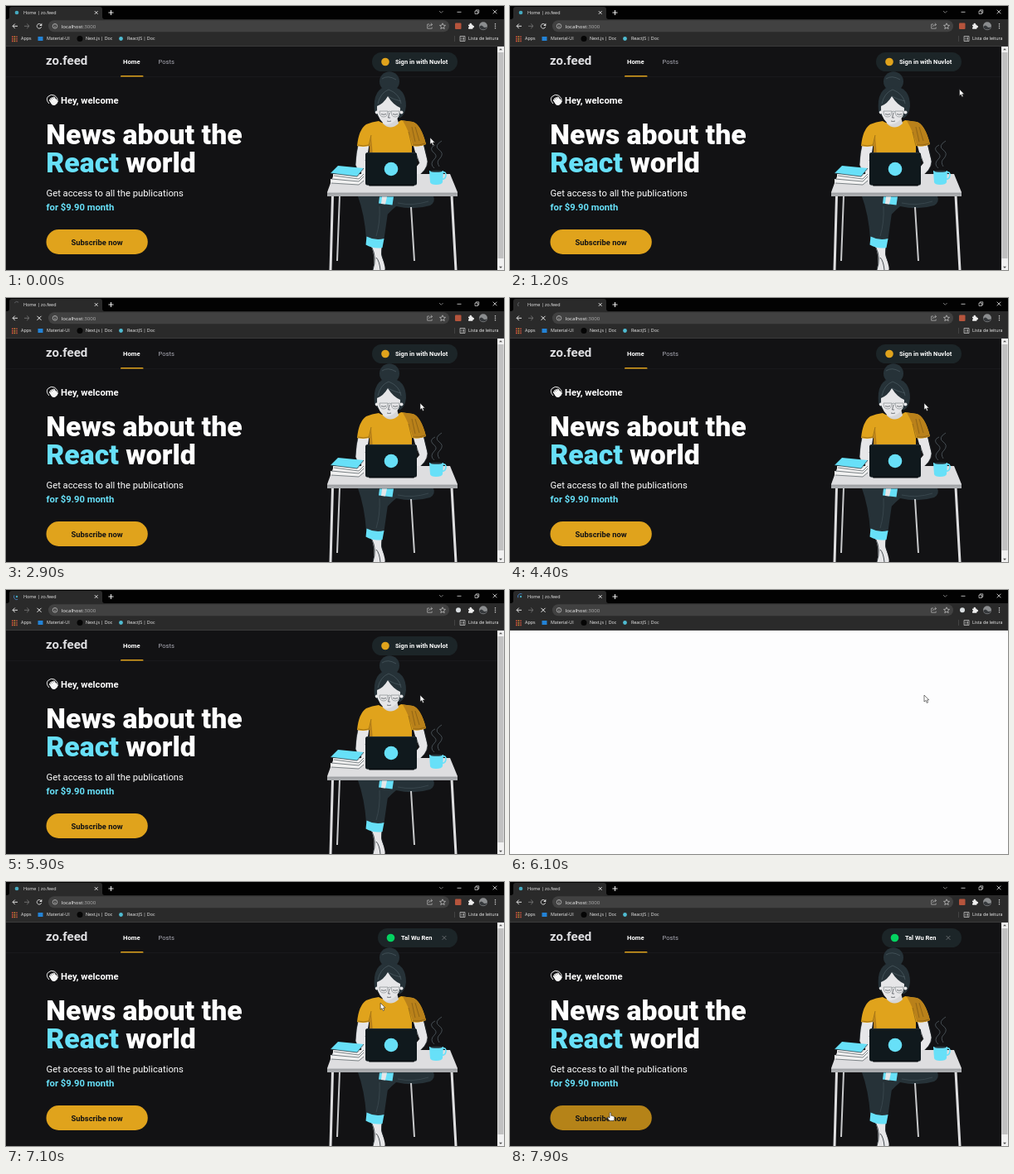
Animation, 600 px wide and 319 px high, one loop 8000 ms. Source, as an HTML page with a canvas:

```html
<!DOCTYPE html>
<html lang="en">
<head>
<meta charset="utf-8">
<title>Home | zo.feed</title>
<style>
html, body { margin: 0; width: 100%; height: 100%; overflow: hidden; background: #121214; }
canvas { display: block; width: 600px; height: 319px; }
</style>
</head>
<body>
<canvas id="stage" width="600" height="319"></canvas>
<script>
const ctx = document.getElementById("stage").getContext("2d");
const LOOP = 8000, STEP = 100;
const CLICK = 2400, RESPONSE = 5200, DEVTOOLS = 5900, BLANK = 6000, PAINTED = 6200,
      SIGNED_IN = 6500, LOADED = 6600, HOVER = 7800;
const CYAN = "#67e0f8", YELLOW = "#e0a31c", HAIR = "#263238", SKIN = "#e6e6e8", INK = "#20282c";
const UI = '"Open Sans", "Noto Sans", sans-serif', PAGE = "Roboto, sans-serif";

// time, x, y of the pointer tip
const route = [
  [0, 511, 159], [1200, 541.5, 100.5], [1500, 541.5, 100.5], [2100, 497, 68],
  [CLICK, 497, 68], [2800, 499, 127], [6900, 499, 127], [HOVER, 120, 278.5], [LOOP, 120, 278.5]
];

function pointerAt(t) {
  const i = route.findIndex(p => p[0] > t);
  const [t0, x0, y0] = route[i - 1], [t1, x1, y1] = route[i];
  const u = (t - t0) / (t1 - t0), k = u * u * (3 - 2 * u);
  return [x0 + (x1 - x0) * k, y0 + (y1 - y0) * k];
}

function rect(x, y, w, h, color, r = 0) {
  ctx.fillStyle = color;
  ctx.beginPath();
  ctx.roundRect(x, y, w, h, r);
  ctx.fill();
}

function dot(x, y, r, color) {
  ctx.fillStyle = color;
  ctx.beginPath();
  ctx.arc(x, y, r, 0, Math.PI * 2);
  ctx.fill();
}

function shape(d, color) {
  ctx.fillStyle = color;
  ctx.fill(new Path2D(d));
}

function line(d, color, width = 1) {
  ctx.strokeStyle = color;
  ctx.lineWidth = width;
  ctx.stroke(new Path2D(d));
}

function text(str, x, y, size, color, weight = 400, family = PAGE, align = "left") {
  ctx.font = `${weight} ${size}px ${family}`;
  ctx.fillStyle = color;
  ctx.textAlign = align;
  ctx.fillText(str, x, y);
}

function label(str, x, y, color = "#f2f2f2", size = 5.35) {
  text(str, x, y, size, color, 500, UI);
}

function cross(x, y, r, color, width = 0.9) {
  line(`M${x - r} ${y - r}L${x + r} ${y + r}M${x + r} ${y - r}L${x - r} ${y + r}`, color, width);
}

function tabIcon(t) {
  if (t < CLICK || t >= LOADED) return dot(13, 8, 2.3, "#45a9bf");
  const waiting = t < RESPONSE;
  const angle = (t - CLICK) / 1000 * Math.PI * 2 * (waiting ? -0.8 : 1.2);
  ctx.strokeStyle = waiting ? "#6b6e72" : "#4a8fd8";
  ctx.lineWidth = 0.8;
  ctx.beginPath();
  ctx.arc(13, 8, 3.5, angle, angle + (waiting ? 1.6 : 2.4));
  ctx.stroke();
  if (!waiting) dot(13, 8, 1.2, "#45a9bf");
}

function drawBrowser(t) {
  rect(0, 0, 600, 17, "#020202");
  rect(0, 16, 600, 32, "#2a2a2a");
  rect(0, 48, 600, 1, "#3a3a3b");
  shape("M1 16Q4 16 4 13V4Q4 1 7 1H113Q116 1 116 4V13Q116 16 119 16Z", "#2a2a2a");
  tabIcon(t);
  label("Home | zo.feed", 21, 10, "#f0f0f0", 5.4);
  cross(108.7, 8, 1.9, "#e8e8e8");
  line("M123.5 8H129.5M126.5 5V11", "#eee", 1);
  line("M522 6L524.3 8.3L526.6 6", "#aaa", 0.7);
  line("M543.5 7.3H548.5", "#ddd", 0.8);
  line("M565 6H568.5V9.5H565ZM566.3 6V4.8H569.8V8.3H568.5", "#ddd", 0.7);
  cross(589, 7, 2.3, "#e2e2e2", 0.8);

  line("M14 24.3H8.2M10.8 21.5L8 24.3L10.8 27.1", "#e2e2e2", 1);
  line("M22 24.3H27.8M25.2 21.5L28 24.3L25.2 27.1", "#747474", 0.9);
  if (t >= CLICK && t < LOADED) cross(40, 24.3, 2.5, "#eee", 1);
  else {
    line("M42.4 22.8A2.8 2.8 0 1 0 42.7 25.2", "#e2e2e2", 0.9);
    shape("M43.3 20.8V23.9H40.2Z", "#e2e2e2");
  }
  rect(51, 17.3, 483, 14, "#414141", 7);
  line("M56.2 24.3A2.8 2.8 0 1 0 61.8 24.3A2.8 2.8 0 1 0 56.2 24.3M59 23.8V26M59 22.4V23.1", "#ccc", 0.7);
  label("localhost", 66.8, 26.5, "#f7f7f7", 6.15);
  const w = ctx.measureText("localhost").width;
  label(":3000", 66.8 + w, 26.5, "#adadad", 6.15);
  line("M510 22H507.7V27.2H513.2V25.6M509.3 25Q510 22.4 513.5 22.4M511.8 20.6L513.7 22.4L511.8 24.2", "#bbb", 0.7);
  line("M526 20.8L527 23.2L529.5 23.4L527.6 25.1L528.2 27.6L526 26.3L523.8 27.6L524.4 25.1L522.5 23.4L525 23.2Z", "#ccc", 0.7);

  if (t >= DEVTOOLS && t < PAINTED) dot(545, 24.3, 3, "#d8dde0");
  else rect(541, 20.5, 7.5, 7.5, "#b5543c", 1);
  rect(557, 22.4, 5.5, 5.3, "#eee", 0.7);
  dot(559.8, 22, 1.3, "#eee");
  dot(562.7, 25, 1.3, "#eee");
  dot(557, 25, 0.9, "#2a2a2a");
  dot(575, 24.3, 5, "#8b8d8f");
  shape("M570.2 25Q573 22 575 25Q577 27 579.8 24.7A5 5 0 0 1 570.2 25", "#35383b");
  for (const y of [21.8, 24.3, 26.8]) dot(589.5, y, 0.75, "#ddd");

  const palette = ["#e1523d", "#d98a35", "#c0533f"];
  for (let i = 0; i < 9; i++) rect(7 + i % 3 * 2.6, 36.4 + Math.floor(i / 3) * 2.6, 1.6, 1.6, palette[i % 3]);
  label("Apps", 18, 41.4);
  rect(38.5, 37, 6, 5, "#2383d6");
  label("Material-UI", 49, 41.4);
  dot(89, 39.5, 3.5, "#050505");
  label("Next.js | Doc", 96, 41.4);
  dot(138.5, 39.5, 2.4, "#4fbcd2");
  label("ReactJS | Doc", 146, 41.4);
  line("M540.5 36V43", "#505050", 0.7);
  line("M547 36.5H553V42.5H547ZM548.2 38.2H549M550 38.2H552M548.2 39.6H549M550 39.6H552M548.2 41H549M550 41H552", "#d0d0d0", 0.7);
  label("Lista de leitura", 557, 41.4);
}

function drawClap() {
  line("M52 118Q47.5 113 50.5 109.5Q54 106 58.5 108Q63 111 62.3 116", "#f4f4f4", 1);
  ctx.save();
  ctx.translate(57, 114.6);
  ctx.rotate(-0.6);
  rect(-4, -2.2, 8.2, 7.6, "#f6f6f6", 3.8);
  for (let i = 0; i < 4; i++) rect(-3.9 + i * 2, -5 + Math.abs(i - 1.4) * 0.7, 1.8, 6, "#f6f6f6", 0.9);
  ctx.restore();
}

function drawSession(t) {
  const signedIn = t >= SIGNED_IN;
  const x = signedIn ? 448 : 441;
  rect(x, 56, 544 - x, 23, "#1c2528", 11.5);
  dot(signedIn ? 463.5 : 457, 67.5, 4.8, signedIn ? "#04d361" : YELLOW);
  if (signedIn) {
    text("Tal Wu Ren", 476, 70.1, 7.5, "#fff", 700);
    cross(528, 67.4, 2.4, "#777a7e", 0.8);
  } else text("Sign in with Nuvlot", 469, 70.1, 7.5, "#fff", 700);
}

function drawLegs() {
  // crossed leg, then the standing leg with its shoe
  shape("M455 230H515Q518 237 511 241Q492 247 470 242Q458 252 448 266Z", HAIR);
  line("M472 238Q490 242 509 236", "#43525a", 0.6);
  shape("M424 230H456Q462 236 460 250L455 285L434 281Q432 252 424 230Z", HAIR);
  line("M450 242Q451 262 446 278", "#43525a", 0.6);
  shape("M440 290L453 291Q451 300 454 306Q458 319 456 319H442Q446 304 440 290Z", SKIN);
  line("M441 292Q447 304 442 319M453 292Q451 300 455 308M446 304Q450 308 451 319", INK, 0.8);
  shape("M434.5 278.5Q445 284 455.5 281L453.5 292Q443 294 433.5 288.5Z", CYAN);
  shape("M450 230.5L467 230.5L465.5 240.5L449 238.5Z", CYAN);
  shape("M453 230.5H459L457 239.5L452 239Z", SKIN);
}

function drawWoman() {
  // arms
  shape("M425 163L438 164Q437 176 433 188L442 200L438 208Q423 200 421 192Q422 177 425 163Z", SKIN);
  shape("M490 164L502 163Q505 177 508 188Q508 198 493 208L488 202L498 190Q492 176 490 164Z", SKIN);
  line("M425 164Q421 179 421 192Q424 202 435 207M433 187L437 177M502 163Q507 178 508 188Q507 200 494 207M498 190L494 178", INK, 0.7);
  // shirt, its right sleeve in shade
  shape("M449 139Q463 147 476 138L490 140Q500 143 506 167Q497 171 489 169V181H438V169Q429 171 423 169Q425 149 434 143Q441 140 449 139Z", YELLOW);
  shape("M478 138.5L490 140Q500 143 506 167Q498 171 490 168Q486 152 478 138.5Z", "#b9811a");
  shape("M438 169L440 157L442 181H438Z", "#b9811a");
  line("M437 169L440 156M489 169L485 152M424 168Q431 170 437 168M490 168Q498 169 505 166M493 146L498 163M489 146L493 164", "#765313", 0.6);
  // neck, hair and face
  shape("M454 134H471L473 142Q463 151 454 142Z", "#d6d6d8");
  dot(462, 91.3, 12, HAIR);
  shape("M444 128Q441 98 462 97Q482 98 482 121Q481 131 475 135L449 134Z", HAIR);
  shape("M447 121Q455 118 460 109Q466 119 475 123Q476 134 467 140Q459 146 454 141Q446 133 447 121Z", SKIN);
  dot(446.8, 128.5, 2, SKIN);
  dot(476.5, 128.5, 2, SKIN);
  line("M461 101Q451 105 448 118M461 101Q474 106 476 118M453 88Q460 83 470 89M460 109Q467 113 476 115", "#52636b", 0.6);
  line("M450 127H460Q460 134 455 134Q450 134 450 127M464 127H474Q474 134 469 134Q464 134 464 127M460 128Q462 126 464 128", "#858b8f", 0.7);
  line("M452 130.5Q455 132 458 130.5M466 130.5Q469 132 472 130.5M462 129L460.5 135H463M459 139Q461.5 140 464 139", INK, 0.6);
}

function drawDesk() {
  drawLegs();
  line("M402 229L399 308M488 243L492 308", "#c8c9cb", 2);
  line("M393.5 229L391 319M537 229L542 319", "#dedee0", 3);
  shape("M395 203H535L544 225V230H387V225Z", "#dedee0");
  shape("M387 226H544V230H387Z", "#a9abae");
  line("M387 226H544", "#7e8285", 0.6);
  // books
  shape("M391 209L426 212L431 206V210L425 216L391 214Z", "#f1f1f1");
  shape("M394 203L425 206L431 199V206L425 212L394 208Z", "#f1f1f1");
  line("M392 209L425 212L431 206M392 214L425 216L431 211M395 205L425 209L431 203", "#4c565b", 0.7);
  shape("M400 193L431 196L423 206L391 202Z", CYAN);
  line("M391 202L423 206L431 196", HAIR, 0.7);
}

function drawLaptopAndMug() {
  shape("M434 217L439 213H490L495 217Z", "#aeb1b3");
  rect(433, 177, 62, 39.5, "#10191d", 2.5);
  line("M435 177.4H493", "#344046", 0.7);
  rect(437, 215.5, 55, 2, "#0a0f12", 1);
  dot(464, 197, 8.3, CYAN);

  line("M526 201Q530.5 200 530 205Q529 210 525 209", CYAN, 1.6);
  shape("M510 199H527L526 213Q525 216 518 216Q512 216 511 213Z", CYAN);
  ctx.fillStyle = HAIR;
  ctx.beginPath();
  ctx.ellipse(518.5, 199.6, 7.5, 1.1, 0, 0, Math.PI * 2);
  ctx.fill();
  line("M516 196Q510 191 516 185Q521 181 514 176Q510 171 517 168M522 194Q518 188 523 184Q528 178 522 174Q515 169 525 163", "#5b666d", 0.7);
}

function drawPage(t) {
  rect(0, 48.5, 600, 271, "#121214");
  rect(0, 85.4, 592, 0.7, "#202125");
  text("zo.feed", 48, 71, 15, "#e0e0e3", 700);
  text("Home", 141, 70, 7.7, "#fff", 700);
  text("Posts", 183.5, 70, 7.6, "#a8a8b3");
  rect(138, 84, 27.5, 1.6, YELLOW, [1, 1, 0, 0]);
  drawSession(t);

  drawClap();
  text("Hey, welcome", 66, 117.6, 11.25, "#fff", 700);
  text("News about the", 48.3, 167.4, 33.75, "#fff", 900);
  text("React", 48.3, 201.2, 33.75, CYAN, 900);
  const w = ctx.measureText("React").width;
  text(" world", 48.3 + w, 201.2, 33.75, "#fff", 900);
  text("Get access to all the publications", 48.5, 229.7, 11.25, "#fff");
  text("for $9.90 month", 48.5, 246.6, 11.25, CYAN, 700);

  const color = t < HOVER ? YELLOW : t < HOVER + STEP ? "#cb931a" : "#b58318";
  rect(48.5, 270, 122.3, 30, color, 15);
  text("Subscribe now", 109.6, 288.5, 9.4, "#121214", 700, PAGE, "center");

  drawWoman();
  drawDesk();
  drawLaptopAndMug();

  rect(592, 48.5, 8, 271, "#f1f1f1");
  rect(592.5, 56, 7, 249, "#c1c1c1");
  shape("M594 53.3L596 51.2L598 53.3Z", "#555");
  shape("M594 314.8L596 316.9L598 314.8Z", "#555");
}

function drawPointer(t) {
  const [x, y] = pointerAt(t);
  const onLink = t >= HOVER || (t >= 2000 && t <= CLICK);
  const arrow = "M0 0V8L1.8 6.4L3.2 9.4L4.6 8.8L3.3 5.9H5.8Z";
  const hand = "M0 1Q0 0 .9 0T1.8 1V4Q3 3.3 3.3 4.3Q4.5 3.8 4.7 4.8Q6 4.6 5.8 6V7.5Q5.7 9 4.8 10H.2L-2.6 6.4Q-2.4 4.8 -1 5.8L0 6.5Z";
  ctx.save();
  ctx.translate(x, y);
  const d = onLink ? hand : arrow;
  shape(d, "#fff");
  line(d, "#222", 0.6);
  ctx.restore();
}

function draw(now) {
  const t = Math.floor(now % LOOP / STEP) * STEP;
  if (t >= BLANK && t < PAINTED) rect(0, 48, 600, 271, "#fdfdfe");
  else drawPage(t);
  drawBrowser(t);
  drawPointer(t);
}

const start = performance.now();
function frame() {
  draw(performance.now() - start);
  requestAnimationFrame(frame);
}
frame();
</script>
</body>
</html>
```
